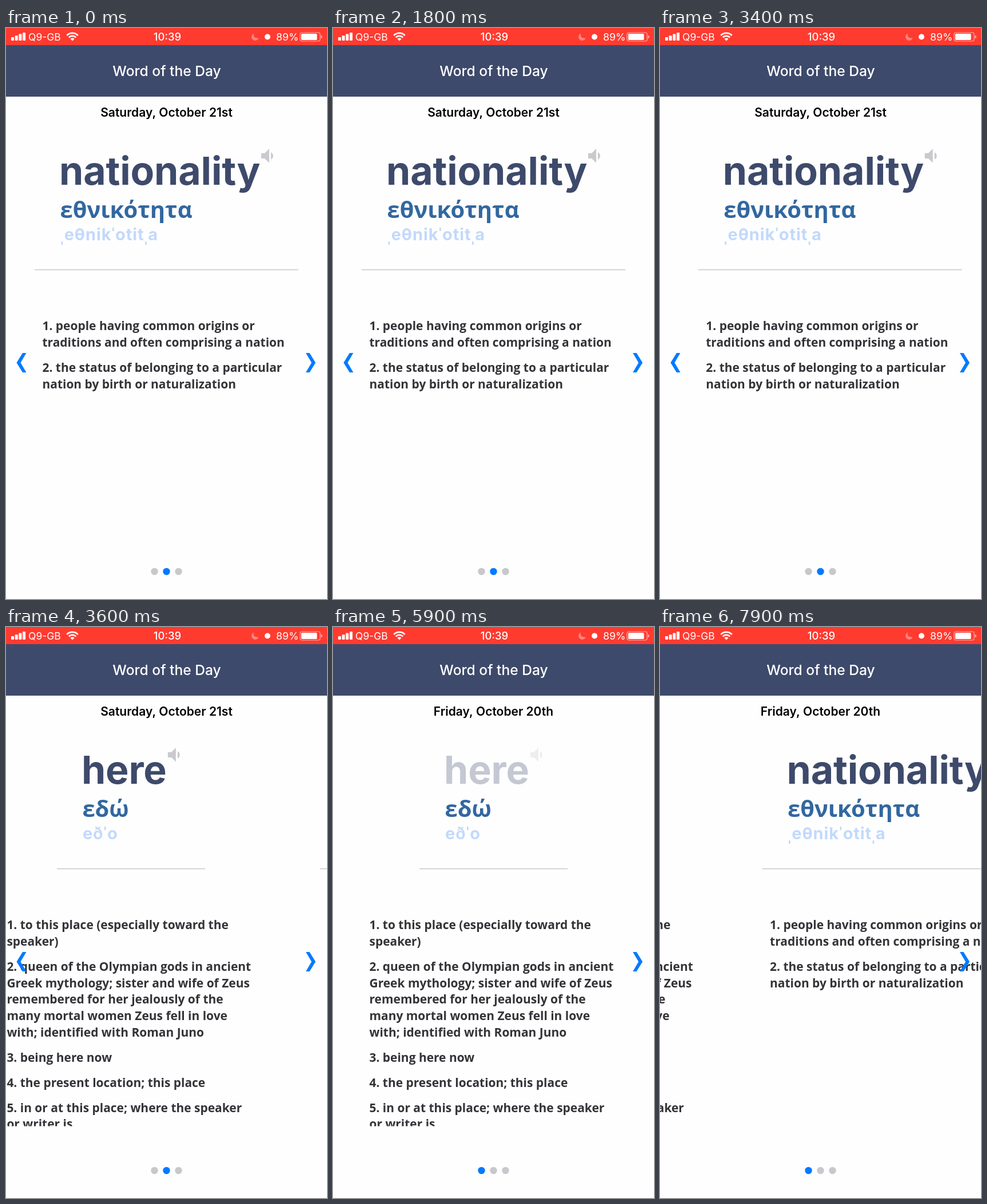
An HTML page with a canvas that plays this animation: 561 by 998 pixels, repeating every 8 s.

```html
<!DOCTYPE html>
<html lang="en">
<head>
<meta charset="utf-8">
<title>Word of the Day</title>
<style>
html, body { margin: 0; width: 100%; height: 100%; overflow: hidden; background: #fefefe; }
canvas { display: block; width: 561px; height: 998px; }
</style>
</head>
<body>
<canvas id="stage"></canvas>
<script>
const W = 561, H = 998, LOOP = 8000, STEP = 100;
const UI = 'Inter, Roboto, sans-serif';
const BODY = '"Open Sans", "Noto Sans", sans-serif';
const RED = '#ff3b30', NAVY = '#3e4a6b', BLUE = '#007aff', GREY = '#c8c8cc';

const canvas = document.getElementById('stage');
const ctx = canvas.getContext('2d');
const ratio = window.devicePixelRatio || 1;
canvas.width = W * ratio;
canvas.height = H * ratio;

const speaker = new Path2D('M18.5 12c0-1.77-1.02-3.29-2.5-4.03v8.05c1.48-.73 2.5-2.25 2.5-4.02zM5 9v6h4l5 5V4L9 9H5z');

const cards = [
  {
    word: 'here', greek: 'εδώ', sound: 'eðˈo',
    x: 194, icon: 345, rule: [151, 410],
    defs: [
      ['1. to this place (especially toward the', 'speaker)'],
      ['2. queen of the Olympian gods in ancient', 'Greek mythology; sister and wife of Zeus',
        'remembered for her jealously of the', 'many mortal women Zeus fell in love',
        'with; identified with Roman Juno'],
      ['3. being here now'],
      ['4. the present location; this place'],
      ['5. in or at this place; where the speaker', 'or writer is']
    ]
  },
  {
    word: 'nationality', greek: 'εθνικότητα', sound: 'ˌeθnikˈotitˌa',
    x: 93, icon: 446, rule: [50, 511],
    defs: [
      ['1. people having common origins or', 'traditions and often comprising a nation'],
      ['2. the status of belonging to a particular', 'nation by birth or naturalization']
    ]
  }
];
const dates = ['Friday, October 20th', 'Saturday, October 21st'];

const clamp = v => Math.max(0, Math.min(1, v));
const smooth = v => { v = clamp(v); return v * v * (3 - 2 * v); };
const quad = v => { v = clamp(v); return v < .5 ? 2 * v * v : 1 - 2 * (1 - v) * (1 - v); };

function text(str, x, y, font, color, align = 'left', spacing = 0) {
  ctx.font = font;
  ctx.fillStyle = color;
  ctx.textAlign = align;
  ctx.letterSpacing = spacing + 'px';
  ctx.fillText(str, x, y);
}

function box(x, y, w, h, r) {
  ctx.beginPath();
  ctx.roundRect(x, y, w, h, r);
}

function dot(x, y, r, color) {
  ctx.fillStyle = color;
  ctx.beginPath();
  ctx.arc(x, y, r, 0, Math.PI * 2);
  ctx.fill();
}

// Opacity of a tapped word: quick dip, then recovery.
function tap(t, start) {
  const d = t - start;
  if (d < 0) return 1;
  return d < 150 ? 1 - .8 * quad(d / 133) : .2 + .8 * quad((d - 150) / 250);
}

function statusBar() {
  ctx.fillStyle = RED;
  ctx.fillRect(0, 0, W, 30);
  ctx.fillStyle = '#fff';
  for (let i = 0; i < 4; i++) {
    const h = 6 + i * 2.7;
    box(9 + i * 6.7, 22 - h, 5, h, 1);
    ctx.fill();
  }
  text('Q9-GB', 39, 21.5, `400 17.5px ${UI}`, '#fff');

  const up = -Math.PI / 2, half = .8;
  ctx.strokeStyle = '#fff';
  ctx.lineWidth = 2.7;
  for (const r of [8.6, 13.6]) {
    ctx.beginPath();
    ctx.arc(116, 22.5, r, up - half, up + half);
    ctx.stroke();
  }
  ctx.beginPath();
  ctx.moveTo(116, 22.5);
  ctx.arc(116, 22.5, 5, up - half, up + half);
  ctx.fill();

  text('10:39', 282, 21.5, `500 18.5px ${UI}`, '#fff', 'center');

  ctx.fillStyle = 'rgba(255,255,255,.38)';
  ctx.beginPath();
  ctx.arc(435.5, 15.5, 6.4, .35, 4.35);
  ctx.quadraticCurveTo(431, 18, 441.5, 17.7);
  ctx.fill();
  dot(457, 15.5, 5, '#fff');
  text('89%', 472, 21.5, `400 17.8px ${UI}`, '#fff');

  ctx.strokeStyle = 'rgba(255,255,255,.6)';
  ctx.lineWidth = 1.2;
  box(514, 8, 35, 15, 3.5);
  ctx.stroke();
  ctx.fillStyle = '#fff';
  box(516, 10, 27.5, 11, 1.5);
  ctx.fill();
  ctx.fillStyle = 'rgba(255,255,255,.6)';
  box(550.5, 13, 2, 5, 1);
  ctx.fill();
}

function header(date) {
  ctx.fillStyle = NAVY;
  ctx.fillRect(0, 30, W, 89.5);
  ctx.fillStyle = '#343e5c';
  ctx.fillRect(0, 119, W, .8);
  text('Word of the Day', 281, 84, `500 24.6px ${UI}`, '#fff', 'center');
  text(date, 280.5, 155, `600 21px ${UI}`, '#000', 'center');
}

function drawCard(card, left, alpha) {
  if (left <= -W || left >= W) return;
  ctx.save();
  ctx.translate(left, 0);

  ctx.globalAlpha = alpha;
  text(card.word, card.x, 274, `700 68px ${UI}`, NAVY, 'left', -.15);
  ctx.save();
  ctx.translate(card.icon, 211);
  ctx.scale(1.55, 1.55);
  ctx.translate(-5, -4);
  ctx.fillStyle = '#c9cacd';
  ctx.fill(speaker);
  ctx.restore();
  ctx.globalAlpha = 1;

  text(card.greek, card.x + 1.5, 332, `700 40px ${BODY}`, '#3267a0');
  text(card.sound, card.x + 2, 371, `700 29px ${UI}`, '#c3d9fc', 'left', .9);
  ctx.fillStyle = GREY;
  ctx.fillRect(card.rule[0], 421.8, card.rule[1] - card.rule[0], 1.5);

  ctx.beginPath();
  ctx.rect(-W, 480, W * 3, 392.5);
  ctx.clip();
  let y = 528.4;
  for (const def of card.defs) {
    for (const line of def) {
      text(line, 63.5, y, `700 20.94px ${BODY}`, '#333338');
      y += 28.6;
    }
    y += 15.5;
  }
  ctx.restore();
}

function arrow(tip, dir) {
  ctx.fillStyle = BLUE;
  ctx.beginPath();
  ctx.moveTo(tip, 585);
  ctx.lineTo(tip - dir * 10.5, 602);
  ctx.lineTo(tip - dir * 17, 602);
  ctx.lineTo(tip - dir * 7, 585);
  ctx.lineTo(tip - dir * 17, 568);
  ctx.lineTo(tip - dir * 10.5, 568);
  ctx.fill();
}

function draw(t) {
  const page = t < 3800 ? 1 : 0;
  const scroll = 1 - smooth((t - 3370) / 290) + smooth((t - 7700) / 290);

  ctx.setTransform(ratio, 0, 0, ratio, 0, 0);
  ctx.fillStyle = '#fefefe';
  ctx.fillRect(0, 0, W, H);
  drawCard(cards[0], -scroll * W, tap(t, 5800));
  drawCard(cards[1], (1 - scroll) * W, tap(t, 1400));
  header(dates[page]);
  statusBar();
  if (page > 0) arrow(18.5, -1);
  arrow(541, 1);
  for (let i = 0; i < 3; i++) dot(259.5 + i * 21, 950, 6.2, i === page ? BLUE : GREY);
}

const start = performance.now();
function tick() {
  const t = (performance.now() - start) % LOOP;
  draw(Math.floor(t / STEP) * STEP);
  requestAnimationFrame(tick);
}
tick();
</script>
</body>
</html>
```
